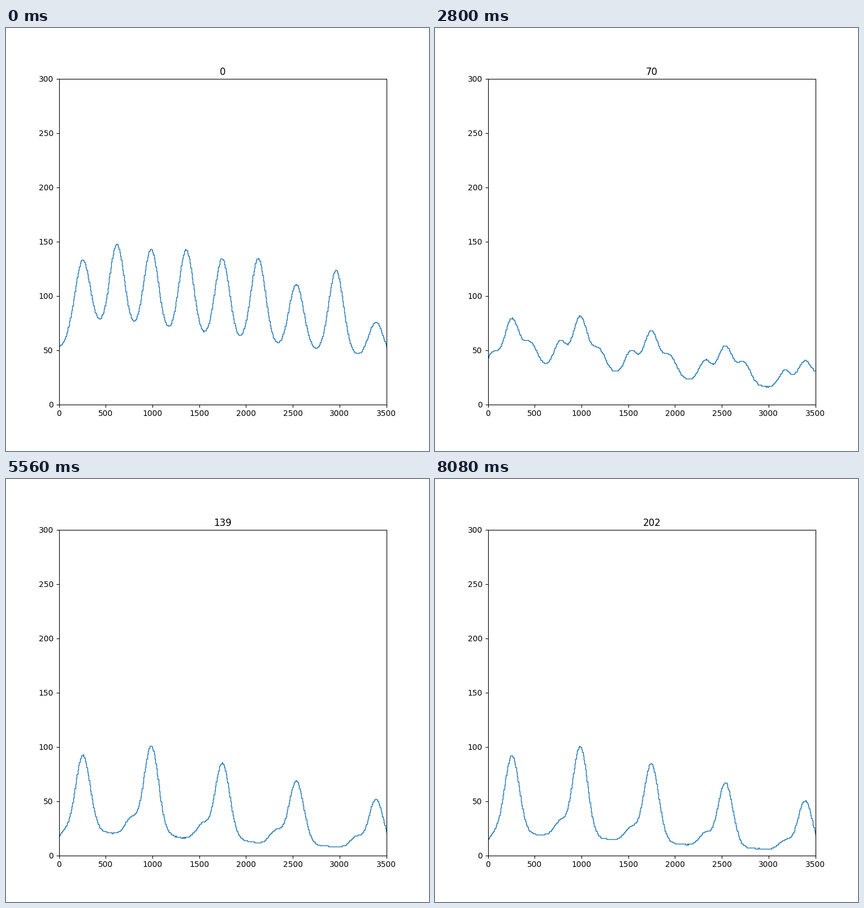
Recreate the animation shown at these times as a matplotlib script. Size 748 px wide and 748 px high, loop 8.12 s.

```python
import numpy as np
import matplotlib.pyplot as plt
from matplotlib.animation import FuncAnimation

SIZE, DPI = 748, 100
FRAMES, INTERVAL = 203, 40
WIDTH, COL = 3504, 8          # profile length, width of one step

CRESTS = np.array([250, 615, 980, 1355, 1740, 2125, 2532, 2957, 3385])
KEPT = CRESTS[::2]            # every other crest survives to the end
START = np.array([62, 79, 78, 81, 76, 80, 60, 77, 33])
SETTLED = np.array([72, 84, 72, 59, 47])

# How each ingredient of the profile changes over the loop.
MOMENTS = [0, 28, 70, 111, 139, 181]
TRACKS = {
    "floor": [74, 60, 40, 24, 23, 22],
    "slope": [32, 28, 28, 19, 18, 19],
    "nine": [1, 0.58, 0, 0, 0, 0],
    "five": [0, 0.15, 0.58, 0.78, 0.99, 1],
    "before": [0, 0, 27, 15, 17, 15],
    "after": [0, 0, 20, 3, 1, 0],
}

x = np.arange(0, WIDTH + 1, COL)
u = x / WIDTH


def bumps(centers, heights, sigma):
    """Sum of bell curves."""
    z = (x[:, None] - centers) / sigma
    return (np.exp(-z * z / 2) * heights).sum(axis=1)


NINE = bumps(CRESTS, START, 78)
FIVE = bumps(KEPT, SETTLED, 78)
BEFORE = bumps(KEPT - 215, 1 - 0.4 * KEPT / WIDTH, 65)
AFTER = bumps(KEPT + 200, 1, 70)
EDGE = 20 * np.exp(-(x / 130) ** 2)


def profile(n):
    p = {name: np.interp(n, MOMENTS, v) for name, v in TRACKS.items()}
    y = (p["floor"] - p["slope"] * u - EDGE
         + p["nine"] * NINE + p["five"] * FIVE
         + p["before"] * BEFORE + p["after"] * AFTER)
    jitter = np.random.default_rng(n).uniform(-0.3, 0.3, len(x))
    return np.round(y + jitter)


fig, ax = plt.subplots(figsize=(SIZE / DPI, SIZE / DPI), dpi=DPI)
ax.set_xlim(0, WIDTH)
ax.set_ylim(0, 300)
line, = ax.plot(x, profile(0), color="tab:blue", lw=1, drawstyle="steps-post")
title = ax.set_title("0", pad=5)


def update(n):
    line.set_ydata(profile(n))
    title.set_text(str(n))
    return line, title


anim = FuncAnimation(fig, update, frames=FRAMES, interval=INTERVAL,
                     repeat=True, repeat_delay=0)
plt.show()
```
